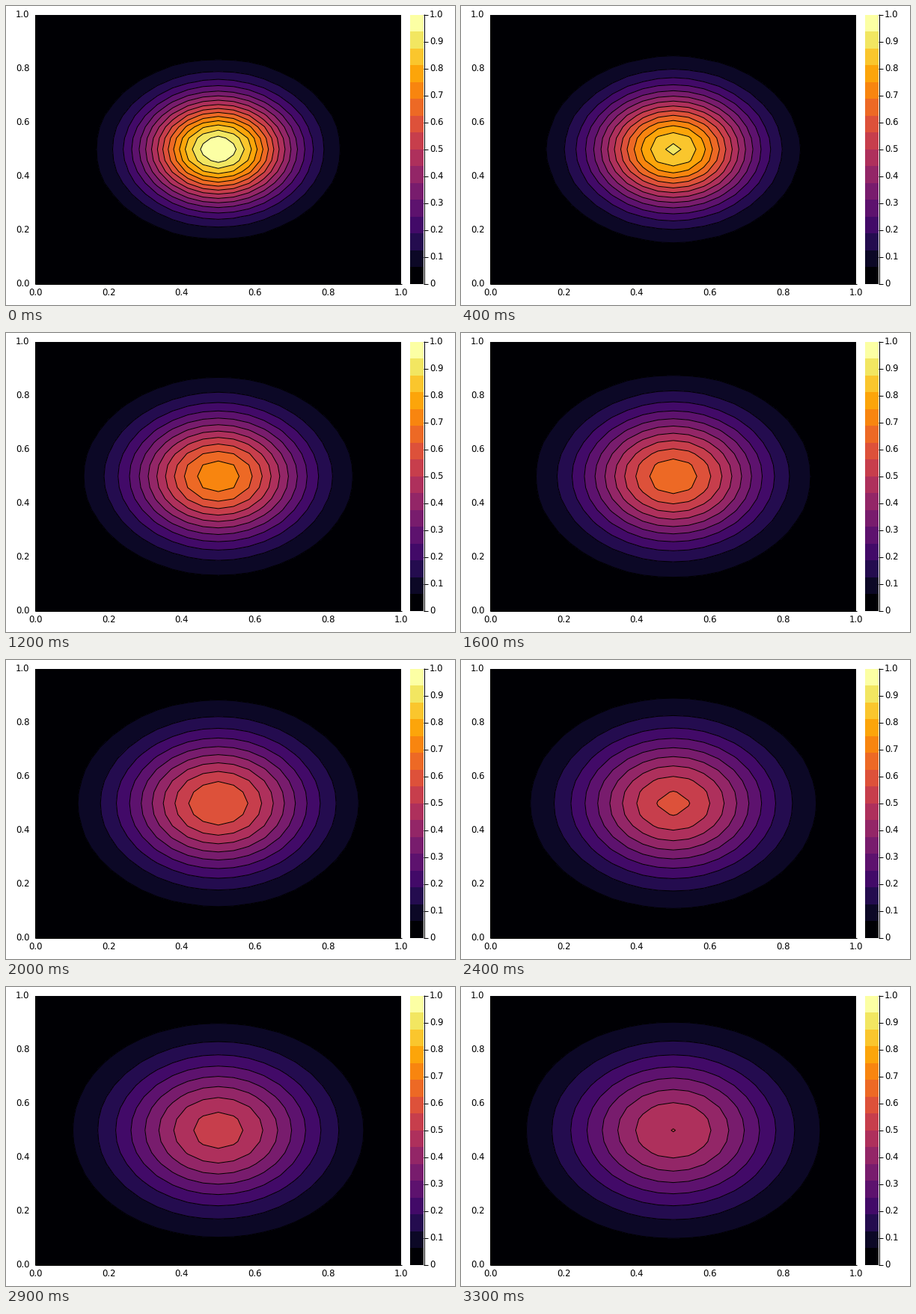
Animation, 600 px wide and 400 px high, one loop 3400 ms. Source, as a matplotlib script:

```python
import numpy as np
import matplotlib.pyplot as plt
from matplotlib.animation import FuncAnimation
from matplotlib.patches import Rectangle

W, H, DPI = 600, 400, 100
FRAMES, INTERVAL = 34, 100
LEFT, RIGHT, TOP, BOTTOM = 39.4, 528.0, 11.8, 371.6
BAR_LEFT, BAR_RIGHT = 540, 558
BANDS = 16
PX = 72 / DPI  # points per pixel

plt.rcParams["font.family"] = "DejaVu Sans"
plt.rcParams["text.hinting"] = "none"

# Heat equation on a coarse grid, edges held at their starting values
N = 25
DIFFUSION = 0.0003  # diffusivity times time step
s = np.linspace(0, 1, N)
gx, gy = np.meshgrid(s, s)


def step(u):
    v = u.copy()
    lap = (u[2:, 1:-1] + u[:-2, 1:-1] + u[1:-1, 2:] + u[1:-1, :-2]
           - 4 * u[1:-1, 1:-1])
    v[1:-1, 1:-1] += DIFFUSION * (N - 1) ** 2 * lap
    return v


states = [np.exp(-25 * ((gx - 0.5) ** 2 + (gy - 0.5) ** 2))]
while len(states) < FRAMES:
    states.append(step(states[-1]))

levels = np.arange(1, BANDS + 1) / BANDS
colors = [plt.get_cmap("inferno")(i / (BANDS - 1)) for i in range(BANDS)]


def to_x(v):
    return LEFT + v * (RIGHT - LEFT)


def to_y(v):
    return BOTTOM - v * (BOTTOM - TOP)


fig = plt.figure(figsize=(W / DPI, H / DPI), dpi=DPI, facecolor="white")
ax = fig.add_axes([0, 0, 1, 1])
ax.set_xlim(0, W)
ax.set_ylim(H, 0)
ax.axis("off")


def box(x0, y0, x1, y1, color, **kw):
    ax.add_patch(Rectangle((x0, y0), x1 - x0, y1 - y0, fc=color, lw=0, **kw))


def line(xs, ys):
    ax.plot(xs, ys, color="black", lw=PX, solid_capstyle="butt", zorder=5)


def label(x, y, text, ha):
    ax.text(x, y + 4.2, text, ha=ha, va="baseline", fontsize=11.6 * PX)


# Plot area, axis lines and tick labels
box(LEFT, TOP, RIGHT, BOTTOM, colors[0], zorder=0)
line([LEFT, LEFT], [TOP, BOTTOM + 0.5])
line([LEFT - 0.5, RIGHT + 0.5], [BOTTOM, BOTTOM])
for v in np.arange(6) / 5:
    label(to_x(v), 383.3, f"{v:.1f}", "center")
    label(31.6, to_y(v), f"{v:.1f}", "right")

# Colour bar
for i, color in enumerate(colors):
    box(BAR_LEFT, to_y((i + 1) / BANDS), BAR_RIGHT, to_y(i / BANDS), color,
        antialiased=False)
line([BAR_RIGHT + 0.5] * 2, [TOP - 0.5, BOTTOM])
for i in range(11):
    y = to_y(i / 10)
    line([BAR_RIGHT, BAR_RIGHT + 6], [y, y])
    label(566, y, f"{i / 10:.1f}" if i else "0", "left")

px, py = to_x(gx), to_y(gy)
drawn = []


def update(k):
    while drawn:
        drawn.pop().remove()
    u = states[k]
    fill_levels = np.append(levels[:-1], 1.01)
    drawn.append(ax.contourf(px, py, u, levels=fill_levels,
                             colors=colors[1:], zorder=1))
    drawn.append(ax.contour(px, py, u, levels=levels[levels < u.max()],
                            colors="black", linewidths=PX, zorder=2))
    return drawn


anim = FuncAnimation(fig, update, frames=FRAMES, interval=INTERVAL,
                     init_func=lambda: update(0), repeat=True, repeat_delay=0,
                     blit=False)
plt.show()
```
